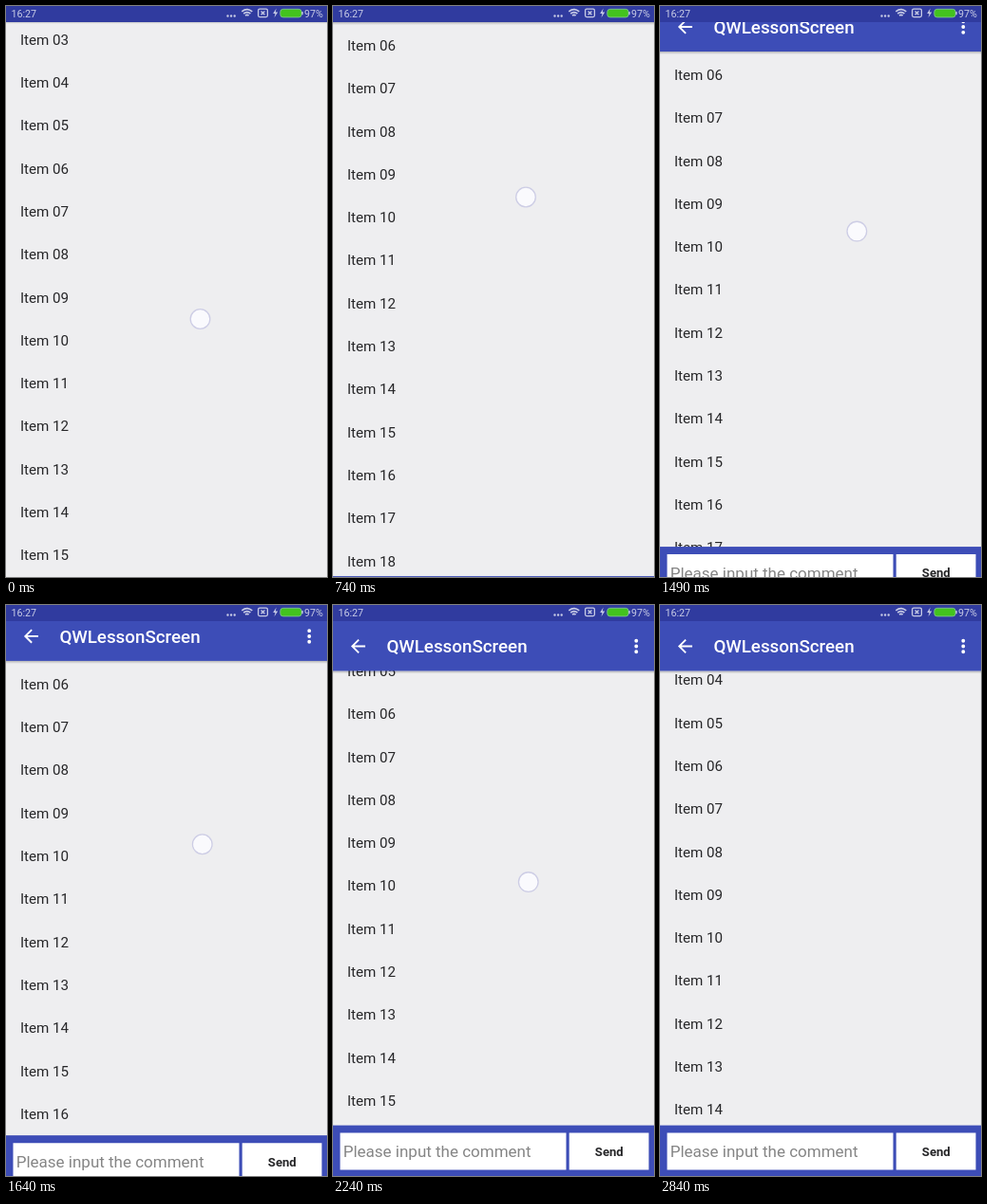
Write an HTML page that moves like this. It is 338x602 px and loops after 4340 ms.

```html
<!DOCTYPE html>
<html lang="en">
<head>
<meta charset="utf-8">
<title>Scrolling list with sliding bars</title>
<style>
  html, body { margin: 0; width: 100%; height: 100%; overflow: hidden; background: #eeeef0; }
  svg { display: block; width: 100%; height: 100%; font-family: Roboto, sans-serif; }
</style>
</head>
<body>
<svg viewBox="0 0 338 602">
  <defs>
    <linearGradient id="shade" x2="0" y2="1">
      <stop stop-color="#000" stop-opacity=".24"/>
      <stop offset="1" stop-color="#000" stop-opacity="0"/>
    </linearGradient>
  </defs>
  <rect width="338" height="602" fill="#eeeef0"/>
  <g id="list" font-size="15.15" fill="#262628"></g>

  <g id="topBar">
    <rect y="69.5" width="338" height="3" fill="url(#shade)"/>
    <rect y="16" width="338" height="53.5" fill="#3d4db7"/>
    <path transform="translate(15.2 32.2) scale(.939)" fill="#fff"
      d="M20 11H7.83l5.59-5.59L12 4l-8 8 8 8 1.41-1.41L7.83 13H20z"/>
    <text x="56.4" y="50.4" font-size="18.78" font-weight="500" fill="#fff">QWLessonScreen</text>
    <path d="M319.3 37.7v0m0 5.8v0m0 5.8v0" stroke="#fff" stroke-width="3.9" stroke-linecap="round"/>
  </g>

  <g id="bottomBar">
    <rect y="548.6" width="338" height="54" fill="#3d4db7"/>
    <path d="M7.5 556.6h238v38.8h-238zM248.7 556.6h83.8v38.8h-83.8z" fill="#fff"/>
    <text x="10.7" y="582.3" font-size="17" fill="#858585">Please input the comment</text>
    <text x="290.8" y="581" font-size="13.1" font-weight="700" text-anchor="middle" fill="#262628">Send</text>
  </g>

  <g fill="#c8cce6">
    <rect width="338" height="17" fill="#303b9f"/>
    <text x="5.5" y="11.8" font-size="10.7">16:27</text>
    <text x="314" y="11.8" font-size="10.7">97%</text>
    <g fill="none" stroke="#c8cce6" stroke-width="1.3">
      <path d="M233.5 10.5v0m3.6 0v0m3.6 0v0" stroke-width="2.4" stroke-linecap="round"/>
      <path d="M248.3 5.8q5.5-4.4 11 0M250.2 8q3.6-2.8 7.2 0M252 10q1.8-1.3 3.6 0" stroke-width="1.6"/>
      <rect x="265.6" y="3.2" width="9.8" height="8.4" rx="1.5"/>
      <path d="M268.6 5.5l3.8 3.8m0-3.8l-3.8 3.8"/>
    </g>
    <path d="M284.6 2.5l-3.4 5.4h2.3l-1 4.3 3.7-5.6h-2.4z"/>
    <rect x="288.8" y="3.3" width="22.4" height="8.6" rx="3" fill="#43c31e" stroke="#86c79a" stroke-width=".8"/>
    <rect x="311.3" y="6" width="1.4" height="3.2"/>
  </g>

  <circle id="touch" r="10.3" fill="#fafafd" stroke="#cdcde5" stroke-width="1.3"/>
</svg>
<script>
const $ = id => document.getElementById(id);
const LOOP = 4340, FIRST = 140, STEP = 150, LAST = 19, PITCH = 45.3;

for (let i = 1; i < 21; i++) {
  const label = document.createElementNS("http://www.w3.org/2000/svg", "text");
  label.setAttribute("x", 14.9);
  label.setAttribute("y", (i - 6) * PITCH + 5.4);
  label.textContent = "Item " + String(i).padStart(2, "0");
  $("list").append(label);
}

const move = (id, x, y) => $(id).setAttribute("transform", `translate(${x} ${y})`);

// Distance covered by step n of a move; "slow" softens its end, "wait" its start
function glide(n, from, to, distance, slow = 1, wait = 1) {
  const u = Math.min(1, Math.max(0, (n - from) / (to - from)));
  return distance * (1 - (1 - u ** wait) ** slow);
}

// The finger swipes up, lifts, then drags down
function touchAt(n) {
  if (n < 6) return [204.5 - glide(n, 0, 5, 1.5, 3), 330 - glide(n, 0, 5, 128.5, 2.25)];
  return [
    213 - glide(n, 7, 13, 6.5, 3) - glide(n, 13, 17, 1.5),
    199.5 + glide(n, 7, 13, 61, 3.4, 2) + glide(n, 13, 17, 71, 1, 1.17)
  ];
}

function draw(now) {
  // The picture advances in steps, then rests until the loop restarts
  const n = Math.min(LAST, Math.floor((now % LOOP - FIRST) / STEP) + 1);
  const shown = glide(n, 8, 13, 52.5, 1.75);
  const bar = shown - (n < 5 ? 53.5 : 52.5);

  move("list", 0, 171.3 - glide(n, 0, 5, 129.8, 2) + shown + glide(n, 13, 19, 75.5, 2.75, 2));
  move("topBar", 0, bar);
  move("bottomBar", 0, -bar);
  move("touch", ...touchAt(n));
  $("touch").style.display = n === 6 || n > 17 ? "none" : "";
}

let start;
function tick(now) {
  start ??= now;
  draw(Math.max(0, now - start));
  requestAnimationFrame(tick);
}
draw(0);
requestAnimationFrame(tick);
</script>
</body>
</html>
```
